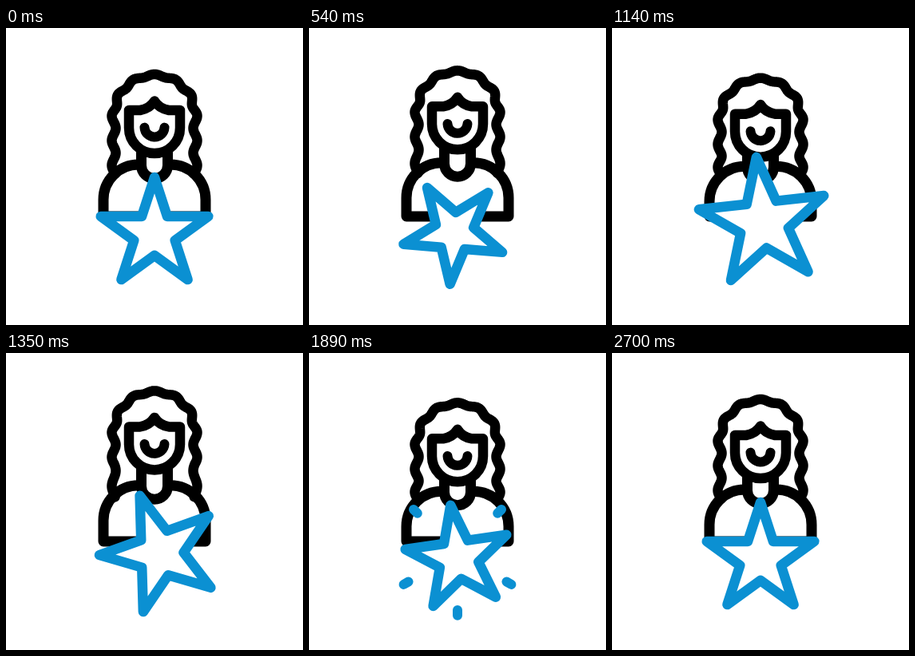
Write an HTML page with a canvas that moves like this. It is 372 px wide and 372 px high and loops after 4800 ms.

```html
<!DOCTYPE html>
<html lang="en">
<head>
<meta charset="utf-8">
<title>Star girl</title>
<style>
html, body { margin: 0; width: 100%; height: 100%; overflow: hidden; background: #fff; }
canvas { display: block; width: 372px; height: 372px; }
</style>
</head>
<body>
<canvas id="stage" width="372" height="372"></canvas>
<script>
const ctx = document.getElementById('stage').getContext('2d');
const LOOP = 4800, END = 2700, STEP = 30;
const CX = 186, CY = 251;
const BLACK = '#000', BLUE = '#0b90d2';
const { PI, sin, cos } = Math;

const rad = deg => deg * PI / 180;
const mix = (a, b, u) => a + (b - a) * u;
const part = (t, from, to) => Math.max(0, Math.min(1, (t - from) / (to - from)));

// Nearly linear, slightly softened at both ends
const soften = u => mix(u, (1 - cos(u * PI)) / 2, .2);
const tween = (t, from, to, a, b) => mix(a, b, soften(part(t, from, to)));

// Wind up, spin once, settle
function spin(t) {
  if (t < 300) return tween(t, 0, 300, 0, -15);
  if (t < 1690) return tween(t, 300, 1690, -15, 350);
  return tween(t, 1690, END, 350, 360);
}

function size(t) {
  if (t < 300) return tween(t, 0, 300, 1, .8);
  if (t < 1050) return tween(t, 300, 1050, .8, 1.2);
  if (t < 1690) return tween(t, 1050, 1690, 1.2, .94);
  return tween(t, 1690, END, .94, 1);
}

// Two quick head bobs, the last dip slower
function bob(t) {
  return t < 1800 ? -15 * sin(t / 600 * PI) : 14 * sin((t - 1800) / 900 * PI);
}

function stroke(color, width, path, fill) {
  ctx.beginPath();
  path();
  ctx.strokeStyle = color;
  ctx.lineWidth = width;
  ctx.lineCap = ctx.lineJoin = 'round';
  if (fill) ctx.fill();
  ctx.stroke();
}

// Wavy arch: a half circle on two straight sides, s measured from the top
function hair(h) {
  const R = 51, ARC = R * PI / 2, LENGTH = ARC + 73;
  stroke(BLACK, 12.5, () => {
    for (let s = -LENGTH; s <= LENGTH; s++) {
      const a = Math.abs(s), down = Math.max(0, a - ARC);
      const angle = Math.min(a / R, PI / 2);
      const phase = down ? down / 31 * 2 * PI : angle * 12;
      const r = R + mix(1, 2.5, part(a, 0, ARC)) * cos(phase);
      const y = 110 + down - r * cos(angle);
      ctx.lineTo(CX + Math.sign(s) * r * sin(angle), y + h * mix(1, .25, part(y, 150, 183)));
    }
  });
}

function body(h) {
  const b = h / 2;
  stroke(BLACK, 13, () => {
    ctx.moveTo(169.5, 171 + b);
    ctx.arc(166, 215 + b, 44, -PI / 2, PI, true);
    ctx.lineTo(122, 236);
    ctx.lineTo(250, 236);
    ctx.arc(206, 215 + b, 44, 0, -PI / 2, true);
    ctx.lineTo(202.5, 171 + b);
  });
  stroke(BLACK, 13, () => {
    ctx.moveTo(202.5, 154 + h);
    ctx.arc(CX, 172 + b, 16.5, 0, PI);
    ctx.lineTo(169.5, 154 + h);
  });
}

function face(h) {
  stroke(BLACK, 12.5, () => {
    ctx.moveTo(154, 103 + h);
    ctx.lineTo(168, 103 + h);
    ctx.quadraticCurveTo(180, 101 + h, CX, 91.5 + h);
    ctx.quadraticCurveTo(192, 101 + h, 204, 103 + h);
    ctx.lineTo(218, 103 + h);
    ctx.arc(CX, 125 + h, 32, 0, PI);
    ctx.closePath();
  }, true);
  stroke(BLACK, 12, () => ctx.arc(CX, 124 + h, 12.5, .05, PI - .05));
}

function star(t) {
  const R = 70.8;
  ctx.save();
  ctx.translate(CX, CY);
  ctx.rotate(rad(spin(t)));
  const k = size(t);
  stroke(BLUE, 12.5, () => {
    for (let i = 0; i < 10; i++) {
      const a = rad(i * 36 - 90), r = i % 2 ? R * .382 : R;
      ctx.lineTo(k * r * cos(a), k * (r * sin(a) + 6.8));
    }
    ctx.closePath();
  }, true);
  ctx.restore();
}

function rays(t) {
  const head = 71 + 32 * (1 - (1 - part(t, 1800, 2600)) ** 2);
  const tail = 71 + 32 * part(t, 1900, 2640) ** 2;
  if (head - tail < 2) return;
  for (const deg of [-45, 30, 90, 150, 225]) {
    const x = cos(rad(deg)), y = sin(rad(deg));
    stroke(BLUE, 12, () => {
      ctx.moveTo(CX + x * tail, CY + y * tail);
      ctx.lineTo(CX + x * head, CY + y * head);
    });
  }
}

function draw(t) {
  const h = bob(t);
  ctx.fillStyle = '#fff';
  ctx.fillRect(0, 0, 372, 372);
  hair(h);
  body(h);
  face(h);
  star(t);
  rays(t);
}

const start = performance.now();
function tick() {
  const t = (performance.now() - start) % LOOP;
  draw(Math.min(END, Math.floor(t / STEP) * STEP));
  requestAnimationFrame(tick);
}
tick();
</script>
</body>
</html>
```
